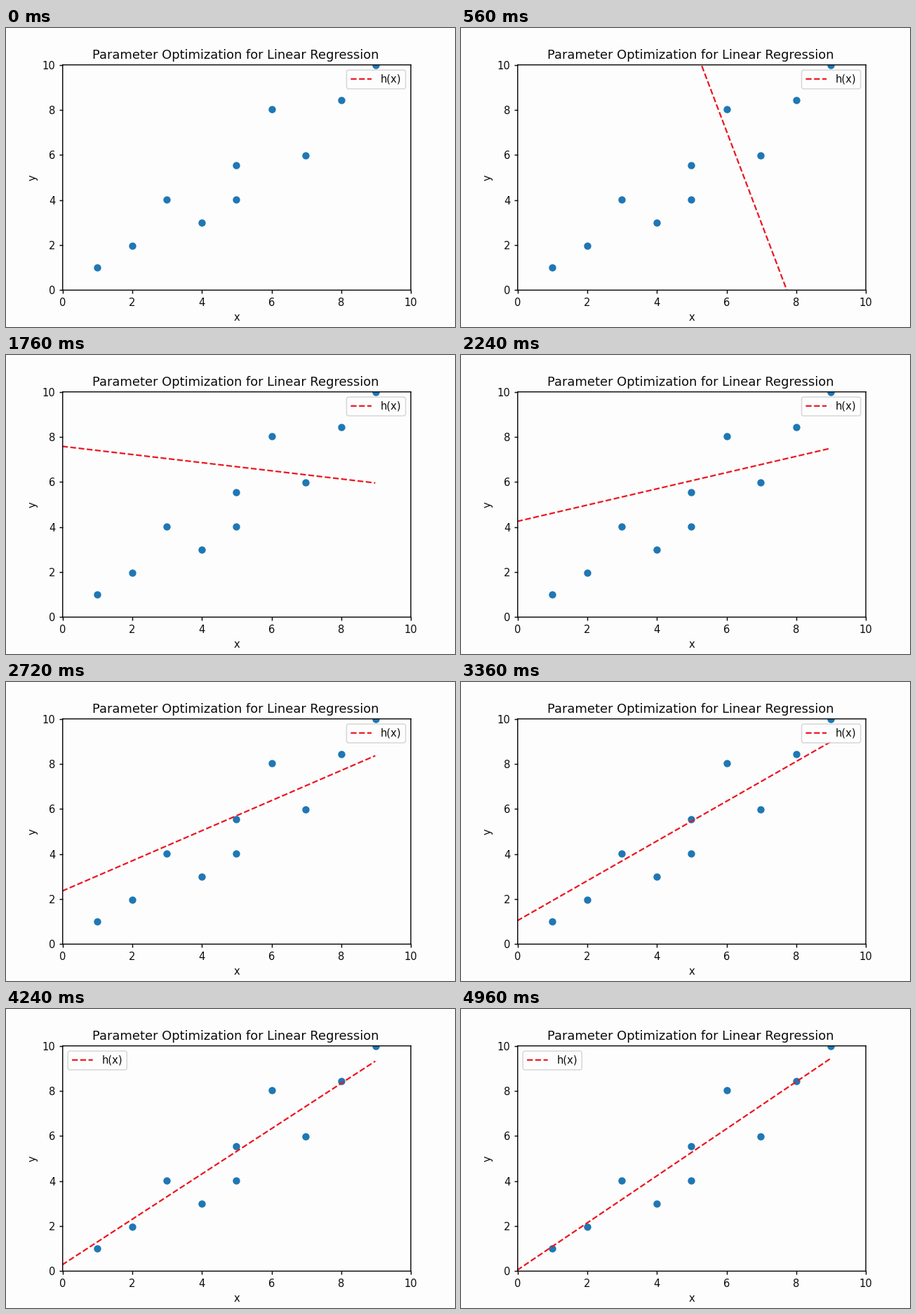
A matplotlib script that plays this animation: 640x427 px, repeating every 5040 ms.

```python
import matplotlib.pyplot as plt
import numpy as np
from matplotlib.animation import FuncAnimation
from matplotlib.transforms import Affine2D

WIDTH, HEIGHT, DPI = 640, 427, 320 / 3
FRAMES, INTERVAL = 63, 80
LEGEND_SWITCH = 43  # the line end reaches the legend here
PAPER, INK, RED = "#fdfdfd", "#0c0c0c", "#ee1520"

# The chart is laid out on a coarse grid, enlarged to the stage.
COLS, ROWS = 432, 288
LEFT, RIGHT, TOP, BOTTOM = 54, 388.8, 34.56, 252

plt.rcParams.update({
    "font.family": "DejaVu Sans",
    "font.size": 10,
    "text.color": INK,
    "axes.labelcolor": INK,
    "axes.edgecolor": INK,
    "axes.linewidth": 1,
    "xtick.color": INK,
    "ytick.color": INK,
    "xtick.major.width": 1,
    "ytick.major.width": 1,
    "path.snap": False,
})


def to_grid(x, y):
    return LEFT + (RIGHT - LEFT) * x / 10, BOTTOM - (BOTTOM - TOP) * y / 10


def snap(value):
    """Centre of the nearest grid cell."""
    return np.floor(np.asarray(value) + 0.5) + 0.5


x = np.array([1, 2, 3, 4, 5, 5, 6, 7, 8, 9])
y = np.array([1, 2, 4, 3, 5.5, 4, 8, 6, 8.4, 10])
best_slope, best_intercept = np.polyfit(x, y, 1)

# Gradient descent creeps along the flattest direction of the squared error.
hessian = np.array([[1, x.mean()], [x.mean(), (x ** 2).mean()]])
_, vectors = np.linalg.eigh(hessian)
slope_ratio = vectors[1, 0] / vectors[0, 0]
START_ERROR, DECAY = 61.2, 0.0942

line_x = np.array([0, 9])


def hypothesis(step):
    error = START_ERROR * np.exp(-DECAY * step)
    slope = best_slope + slope_ratio * error
    return best_intercept + error + slope * line_x


# The tiny margin keeps the pixel size from being rounded down.
fig, ax = plt.subplots(
    figsize=((WIDTH + 1e-3) / DPI, (HEIGHT + 1e-3) / DPI), dpi=DPI, facecolor=PAPER
)
grid = Affine2D().scale(1 / COLS, -1 / ROWS).translate(0, 1) + fig.transFigure
fig.subplots_adjust(
    left=snap(LEFT) / COLS,
    right=snap(RIGHT) / COLS,
    bottom=1 - snap(BOTTOM) / ROWS,
    top=1 - snap(TOP) / ROWS,
)
ax.set_facecolor(PAPER)
ax.set(xlim=(0, 10), ylim=(0, 10), xlabel="x", ylabel="y")
ax.set_title("Parameter Optimization for Linear Regression", fontsize=12.1, x=0.497)
ax.scatter(*snap(to_grid(x, y)), color="#1f77b4", transform=grid)
line, = ax.plot([], [], "--", color=RED, label="h(x)", transform=grid)
legend = ax.legend(loc="upper right", facecolor=PAPER, handletextpad=0.88)


def update(step):
    # The first guess lies outside the view.
    if step == 0:
        line.set_data([], [])
    else:
        line.set_data(*to_grid(line_x, hypothesis(step)))
    legend.set_loc("upper left" if step >= LEGEND_SWITCH else "upper right")
    return line, legend


anim = FuncAnimation(fig, update, frames=FRAMES, interval=INTERVAL, repeat=True)
plt.show()
```
